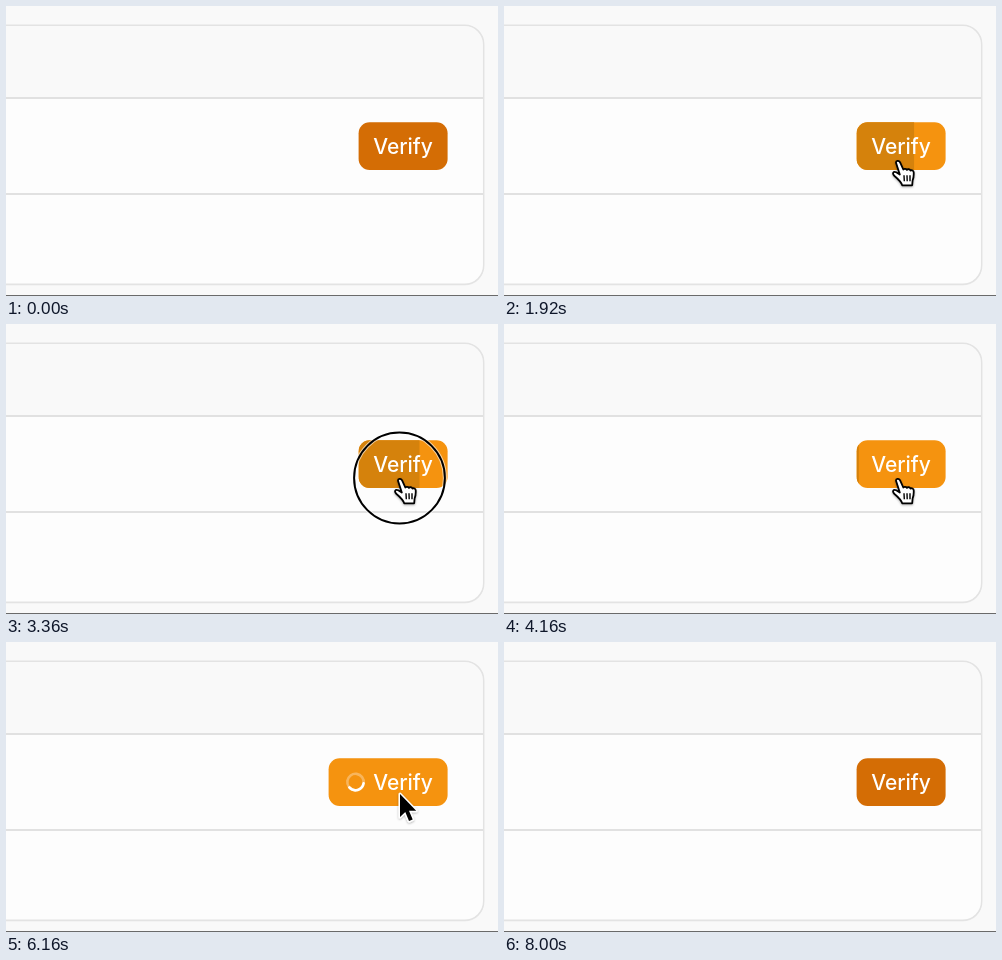
These frames come from a looping animation (492 px wide and 290 px high, 8.08 s). An HTML page:

```html
<!DOCTYPE html>
<html lang="en">
<head>
<meta charset="utf-8">
<title>Hold to verify</title>
<style>
  html, body { margin: 0; width: 100%; height: 100%; overflow: hidden; background: #f9f9f9; }
  svg { display: block; width: 492px; height: 290px; }
  text { font: 500 21px Inter, Roboto, sans-serif; fill: #fff; }
</style>
</head>
<body>
<svg viewBox="0 0 492 290">
  <defs>
    <clipPath id="shape"><rect id="clip" y="116.3" height="47.6" rx="11"/></clipPath>
    <filter id="soft" x="-50%" y="-50%" width="200%" height="200%">
      <feDropShadow dx="0" dy="1" stdDeviation="1" flood-opacity=".3"/>
    </filter>
  </defs>

  <rect width="492" height="290" fill="#f9f9f9"/>
  <rect x="-30" y="20.5" width="508" height="259" rx="19" fill="#ededed"/>
  <rect x="-30" y="19.3" width="507.7" height="259" rx="19" fill="#fdfdfd"/>
  <path d="M0 19.3H458.7a19 19 0 0 1 19 19V92H0Z" fill="#f9f9f9"/>
  <path d="M0 92H477.5M0 188H477.5" stroke="#e1e1e1" stroke-width="1.8"/>
  <rect x="-30" y="19.3" width="507.7" height="259" rx="19" fill="none" stroke="#e3e3e3" stroke-width="1.5"/>
  <path d="M0 289.5H492" stroke="#6a6a6a"/>

  <g clip-path="url(#shape)">
    <rect id="base" x="320" y="116" width="122" height="49"/>
    <rect id="fill" y="116" height="49" fill="#d5820c"/>
  </g>
  <g id="spinner" fill="none" stroke="#fff" stroke-width="2.6">
    <circle r="8.2" opacity=".32"/>
    <path d="M8.2 0A8.2 8.2 0 0 1 -5.3 6.3" stroke-linecap="round"/>
  </g>
  <text x="397" y="148" text-anchor="middle">Verify</text>

  <g id="ring" fill="none">
    <circle cx="393.5" cy="154" r="45.4" stroke="#fff" stroke-width="4" opacity=".6"/>
    <circle cx="393.5" cy="154" r="45.4" stroke="#000" stroke-width="2"/>
  </g>
  <g id="cursor" filter="url(#soft)" stroke-linejoin="round">
    <path id="arrow" d="M0 0V23L5.3 18L9 27L12.7 25.4L9 16.7H16.2Z"
      fill="#000" stroke="#fff" stroke-width="3" paint-order="stroke"/>
    <g id="hand" transform="translate(-1 3)">
      <path id="palm" d="M-1 1.8C-1.2-.3 1.9-.8 3 1.2L6.3 8.5C7 7.5 9.4 7.5 9.9 8.9C10.8 7.8 13 8 13.5 9.6C14.6 8.8 16.6 9.6 16.7 11.3C16.9 14.5 16.6 17 15.6 19.5L15.2 24.3H5.2C4.2 21 1 18-2.5 15C-5.3 12.3-3.6 10-.8 11.3L2.8 13.6Z"
        fill="#fff" stroke="#000" stroke-width="1.8"/>
      <path d="M7 14.2L7.3 20.3M10 14.2L10.2 20.3M13 14.2V20.3" stroke="#000" stroke-width="1.4"/>
    </g>
  </g>
</svg>
<script>
const LOOP = 8080;
const RIGHT = 441.6, WIDTH = 89, EXTRA = 30;
const HOVER = 897, LEAVE = 7080, LOAD = 5610, DONE = 6770;
const HOLD = 1000, RESET = 800;
const presses = [[1200, 1775], [2960, 3535], [4610, 5690]];
const idle = [212, 109, 5], hot = [245, 147, 15];

const $ = id => document.getElementById(id);
const set = (id, attrs) => {
  for (const k in attrs) $(id).setAttribute(k, attrs[k]);
};
const ramp = (t, from, span) => Math.min(1, Math.max(0, (t - from) / span));
const mix = (a, b, k) => a + (b - a) * k;

// CSS-style cubic-bezier, solved by bisection
function bezier(x1, y1, x2, y2) {
  const at = (a, b, s) => 3 * a * s * (1 - s) ** 2 + 3 * b * s * s * (1 - s) + s ** 3;
  return x => {
    if (x <= 0 || x >= 1) return x;
    let lo = 0, hi = 1;
    for (let i = 0; i < 24; i++) {
      const mid = (lo + hi) / 2;
      if (at(x1, x2, mid) < x) lo = mid; else hi = mid;
    }
    return at(y1, y2, lo);
  };
}
const ease = bezier(.25, .1, .25, 1);
const swift = bezier(.4, 0, .2, 1);
const inOut = u => u < .5 ? 4 * u ** 3 : 1 - 4 * (1 - u) ** 3;

function progress(t) {
  const press = presses.filter(p => t >= p[0]).pop();
  if (!press) return 0;
  const [down, up] = press;
  const held = ease(ramp(Math.min(t, up), down, HOLD));
  return t < up || t >= LOAD ? held : held * (1 - ease(ramp(t, up, RESET)));
}

function draw(t) {
  const hover = swift(ramp(t, HOVER, 150)) * (1 - swift(ramp(t, LEAVE, 420)));
  const load = swift(ramp(t, LOAD, 200)) - swift(ramp(t, DONE, 200));
  const loading = t >= LOAD && t < DONE;
  const width = WIDTH + EXTRA * load, left = RIGHT - width;

  set('clip', { x: left, width });
  set('base', { fill: `rgb(${idle.map((c, i) => Math.round(mix(c, hot[i], hover)))})` });
  set('fill', { x: left, width: width * progress(t), opacity: 1 - swift(ramp(t, LOAD, 200)) });
  set('spinner', {
    transform: `translate(${mix(364, 349.5, load)} 140) rotate(${(t - 6160) * .36 + 8})`,
    opacity: load
  });

  const pressed = presses.some(([down, up]) => t >= down && t < up);
  set('ring', { opacity: +pressed });

  const move = inOut(ramp(t, 300, 860));
  set('cursor', {
    transform: `translate(${mix(338.5, 394, move)} ${mix(268, 152, move)})`,
    opacity: ramp(t, 30, 130) * (1 - ramp(t, LEAVE, 420))
  });
  const pointing = t >= HOVER && !loading;
  set('hand', { opacity: +pointing });
  set('arrow', { opacity: +!pointing });
}

const start = performance.now();
function tick() {
  draw((performance.now() - start) % LOOP);
  requestAnimationFrame(tick);
}
tick();
</script>
</body>
</html>
```
